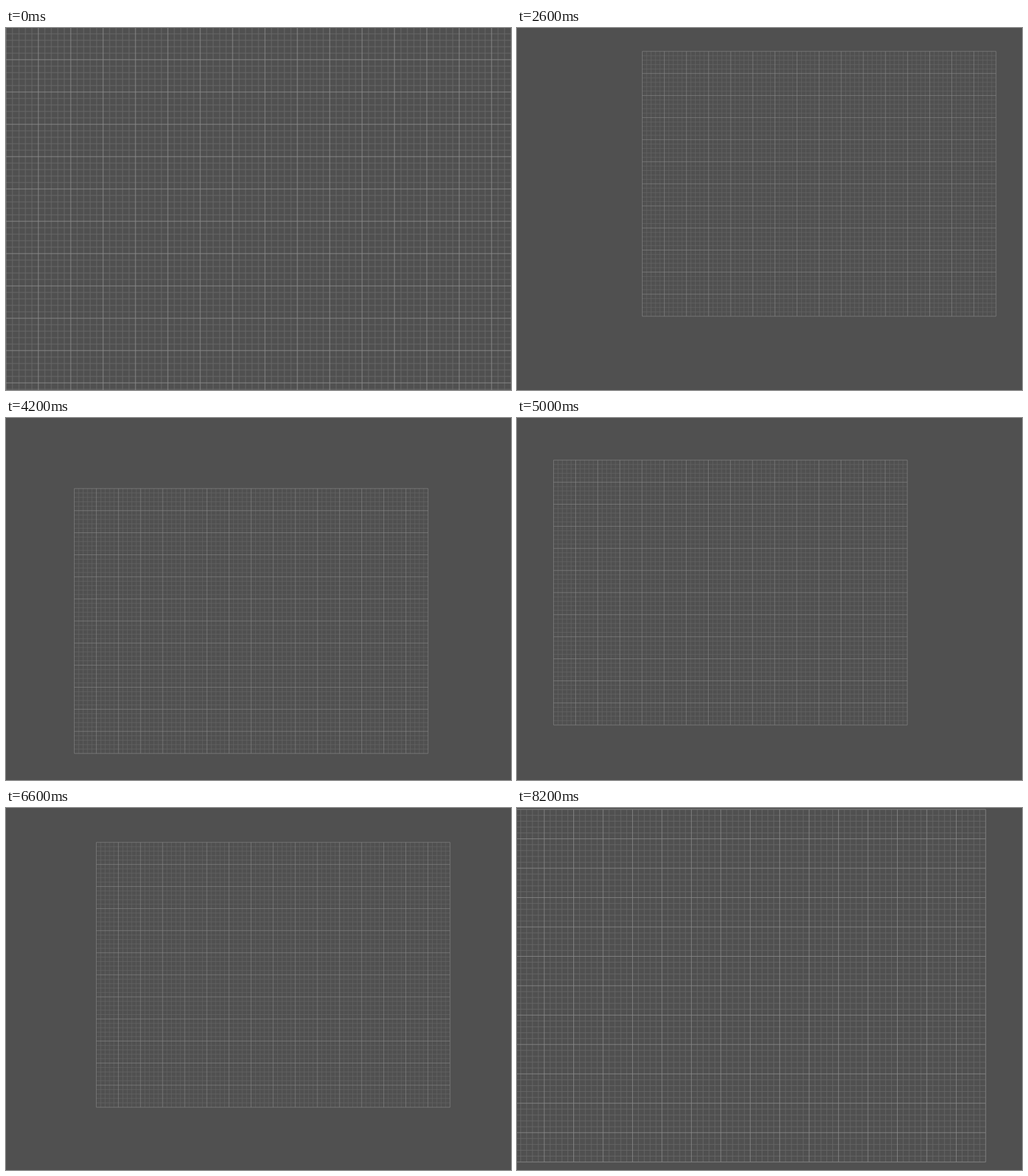
Animation, 780 px wide and 560 px high, one loop 9800 ms. Source, as an HTML page:

```html
<!DOCTYPE html>
<html lang="en">
<head>
<meta charset="utf-8">
<title>Grid pan and zoom</title>
<style>
html, body { margin: 0; width: 100%; height: 100%; overflow: hidden; background: #505050; }
svg { display: block; width: 780px; height: 560px; }
path { fill: none; stroke-width: 1; }
</style>
</head>
<body>
<svg viewBox="0 0 780 560">
  <g id="grid">
    <path id="minor" stroke="#686868"/>
    <path id="major" stroke="#8a8a8a"/>
  </g>
</svg>
<script>
const LOOP = 9800, W = 800, H = 600, ZOOM = 1.1;
const STEP = 200, DRAG_START = 3400, DRAG_END = 6600;
const ZOOM_OUT = [1600, 2000, 2200, 2600];
const ZOOM_IN = [7000, 7400, 8200];

// Key points of the drag, relative to where it begins
const DRAG = [
  [0, 1], [-30, 49], [-88, 73], [-127, 62], [-137, 29],
  [-119, 3], [-82, -1], [-57, 9], [-54, 17]
];

const $ = id => document.getElementById(id);

function lines(keep) {
  let d = '';
  for (let x = 0; x <= W; x += 10) if (keep(x)) d += `M${x} 0V${H}`;
  for (let y = 0; y <= H; y += 10) if (keep(y)) d += `M0 ${y}H${W}`;
  return d;
}
$('minor').setAttribute('d', lines(v => v % 50 !== 0));
$('major').setAttribute('d', lines(v => v % 50 === 0));

// Scale the view while the point under the cursor stays put
function zoomAt(view, cx, cy, k) {
  view.x = cx + (view.x - cx) * k;
  view.y = cy + (view.y - cy) * k;
  view.k *= k;
}

// Catmull-Rom curve through the drag points, u from 0 to 1
function dragAt(u, axis) {
  const last = DRAG.length - 1;
  const i = Math.min(Math.floor(u * last), last - 1), f = u * last - i;
  const at = n => DRAG[Math.max(0, Math.min(last, n))][axis];
  const [a, b, c, d] = [at(i - 1), at(i), at(i + 1), at(i + 2)];
  return Math.round(b + f / 2 * (c - a + f * (2 * a - 5 * b + 4 * c - d + f * (3 * (b - c) + d - a))));
}

function viewAt(t) {
  const view = { x: 0, y: -1, k: 1 };
  ZOOM_OUT.forEach((time, i) => {
    if (t >= time) zoomAt(view, 633 - 14 * i, 87 + 18 * i, 1 / ZOOM);
  });
  if (t >= DRAG_START) {
    const u = (Math.min(t, DRAG_END) - DRAG_START) / (DRAG_END - DRAG_START);
    view.x += dragAt(u, 0);
    view.y += dragAt(u, 1);
  }
  for (const time of ZOOM_IN) if (t >= time) zoomAt(view, 571, 207, ZOOM);
  return view;
}

function draw(t) {
  const { x, y, k } = viewAt(Math.floor(t / STEP) * STEP);
  $('grid').setAttribute('transform', `translate(${x} ${y}) scale(${k})`);
}

const start = performance.now();
function tick() {
  draw((performance.now() - start) % LOOP);
  requestAnimationFrame(tick);
}
tick();
</script>
</body>
</html>
```
